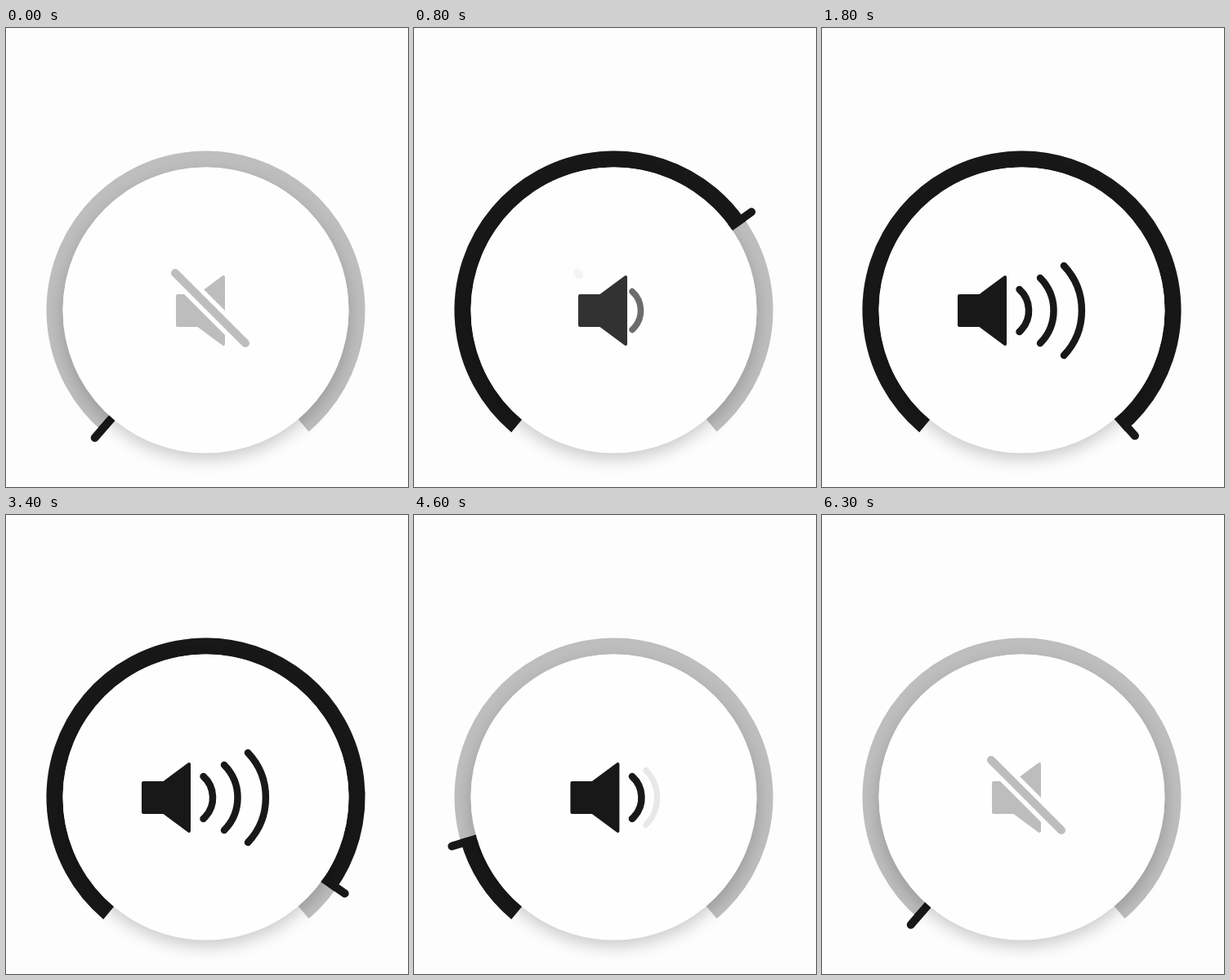
An HTML page with a canvas for the animation above (8 s loop, 492 px wide and 562 px high).

```html
<!DOCTYPE html>
<html lang="en">
<head>
<meta charset="utf-8">
<title>Volume dial</title>
<style>
  html, body { margin: 0; width: 100%; height: 100%; overflow: hidden; background: #fdfdfd; }
  canvas { display: block; }
</style>
</head>
<body>
<canvas id="stage" width="492" height="562"></canvas>
<script>
const ctx = document.getElementById('stage').getContext('2d');
const LOOP = 8000, STEP = 100;
const CX = 244.5, CY = 345.5, ICON_Y = 346;
const MIN = 41, MAX = 318; // tick angles, clockwise from straight down
const INK = '#181818', TRACK = '#bebebe', PAPER = '#fdfdfd';

// Degrees left to the full position while the dial turns up
const RISE = [[470, 277], [500, 250], [700, 114], [800, 83.5], [1300, 13.3], [1800, 0.3]];
const FALL_START = 3372, FALL_TAU = 570, FALL_LATE = 5100;

// Each wave: offset from the speaker, half height, radius, start of fade in and out
const WAVES = [
  { x: 75.5, half: 26, r: 35, on: 600, off: 5800 },
  { x: 101, half: 40, r: 56.7, on: 900, off: 4310 },
  { x: 130, half: 55, r: 80, on: 1300, off: 3600 }
];

const clamp = v => Math.max(0, Math.min(1, v));
const smooth = v => { v = clamp(v); return v * v * (3 - 2 * v); };
const pulse = (t, on, off) => smooth((t - on) / 400) - smooth((t - off) / 400);
const rad = deg => (deg + 90) * Math.PI / 180;

function tickAngle(t) {
  if (t < RISE[0][0]) return MIN;
  if (t < 1800) {
    const i = RISE.findIndex(key => key[0] > t);
    const [t0, a] = RISE[i - 1], [t1, b] = RISE[i];
    return MAX - a * Math.pow(b / a, (t - t0) / (t1 - t0));
  }
  if (t < FALL_START) return MAX;
  if (t >= 6300) return MIN;
  const late = Math.max(0, t - FALL_LATE);
  return MIN + (MAX - MIN) * Math.exp(-(t - FALL_START) / FALL_TAU - late / 500);
}

function ringArc(from, to, color) {
  ctx.beginPath();
  ctx.arc(CX, CY, 185, rad(from), rad(to));
  ctx.lineWidth = 20;
  ctx.lineCap = 'butt';
  ctx.strokeStyle = color;
  ctx.stroke();
}

function line(x0, y0, x1, y1, width, color) {
  ctx.beginPath();
  ctx.moveTo(x0, y0);
  ctx.lineTo(x1, y1);
  ctx.lineWidth = width;
  ctx.lineCap = 'round';
  ctx.strokeStyle = color;
  ctx.stroke();
}

function drawDial(angle) {
  ringArc(40, 319.7, TRACK);
  ringArc(40, angle + 1.5, INK);

  const c = Math.cos(rad(angle)), s = Math.sin(rad(angle));
  line(CX + 165 * c, CY + 165 * s, CX + 207 * c, CY + 207 * s, 10, INK);

  ctx.save();
  ctx.shadowColor = 'rgba(0,0,0,.2)';
  ctx.shadowBlur = 20;
  ctx.shadowOffsetY = 8;
  ctx.fillStyle = '#fefefe';
  ctx.beginPath();
  ctx.arc(CX, CY, 175, 0, 2 * Math.PI);
  ctx.fill();
  ctx.restore();
}

function drawSpeaker(color) {
  ctx.beginPath();
  [[2, -18], [27, -18], [58, -41], [58, 41], [27, 18], [2, 18]].forEach(p => ctx.lineTo(...p));
  ctx.closePath();
  ctx.lineWidth = 4;
  ctx.lineJoin = 'round';
  ctx.fillStyle = ctx.strokeStyle = color;
  ctx.fill();
  ctx.stroke();
}

function drawWave({ x, half, r }, shown) {
  const bend = Math.asin(half / r);
  const sag = r - r * Math.cos(bend);
  const scale = 0.8 + 0.2 * shown;
  ctx.save();
  ctx.globalAlpha = clamp(1.7 * shown - 0.22);
  ctx.translate(x + sag / 2 - 10 * Math.min(1, 2 * (1 - shown)), 0);
  ctx.scale(scale, scale);
  ctx.beginPath();
  ctx.arc(sag / 2 - r, 0, r, -bend, bend);
  ctx.lineWidth = 8.5;
  ctx.lineCap = 'round';
  ctx.strokeStyle = INK;
  ctx.stroke();
  ctx.restore();
}

function drawIcon(t) {
  const sound = pulse(t, 500, 5900);
  const shown = WAVES.map(w => pulse(t, w.on, w.off));
  const left = 208 - 14 * shown.reduce((a, b) => a + b);
  const gray = Math.round(189 + (24 - 189) * sound);

  ctx.save();
  ctx.translate(left, ICON_Y);
  drawSpeaker(`rgb(${gray},${gray},${gray})`);
  if (sound < 1) {
    const length = 86 * (1 - sound) ** 2;
    const slash = [-1, -46, length - 1, length - 46];
    line(...slash, 21, '#fefefe');
    ctx.globalAlpha = 1 - sound;
    line(...slash, 10, '#bdbdbd');
    ctx.globalAlpha = 1;
  }
  WAVES.forEach((wave, i) => { if (shown[i] > 0) drawWave(wave, shown[i]); });
  ctx.restore();
}

function render(now) {
  // The motion advances in ten steps per second
  const t = Math.floor((now % LOOP) / STEP) * STEP;
  ctx.fillStyle = PAPER;
  ctx.fillRect(0, 0, 492, 562);
  drawDial(tickAngle(t));
  drawIcon(t);
}

let start;
function frame(now) {
  start ??= now;
  render(now - start);
  requestAnimationFrame(frame);
}
render(0);
requestAnimationFrame(frame);
</script>
</body>
</html>
```
